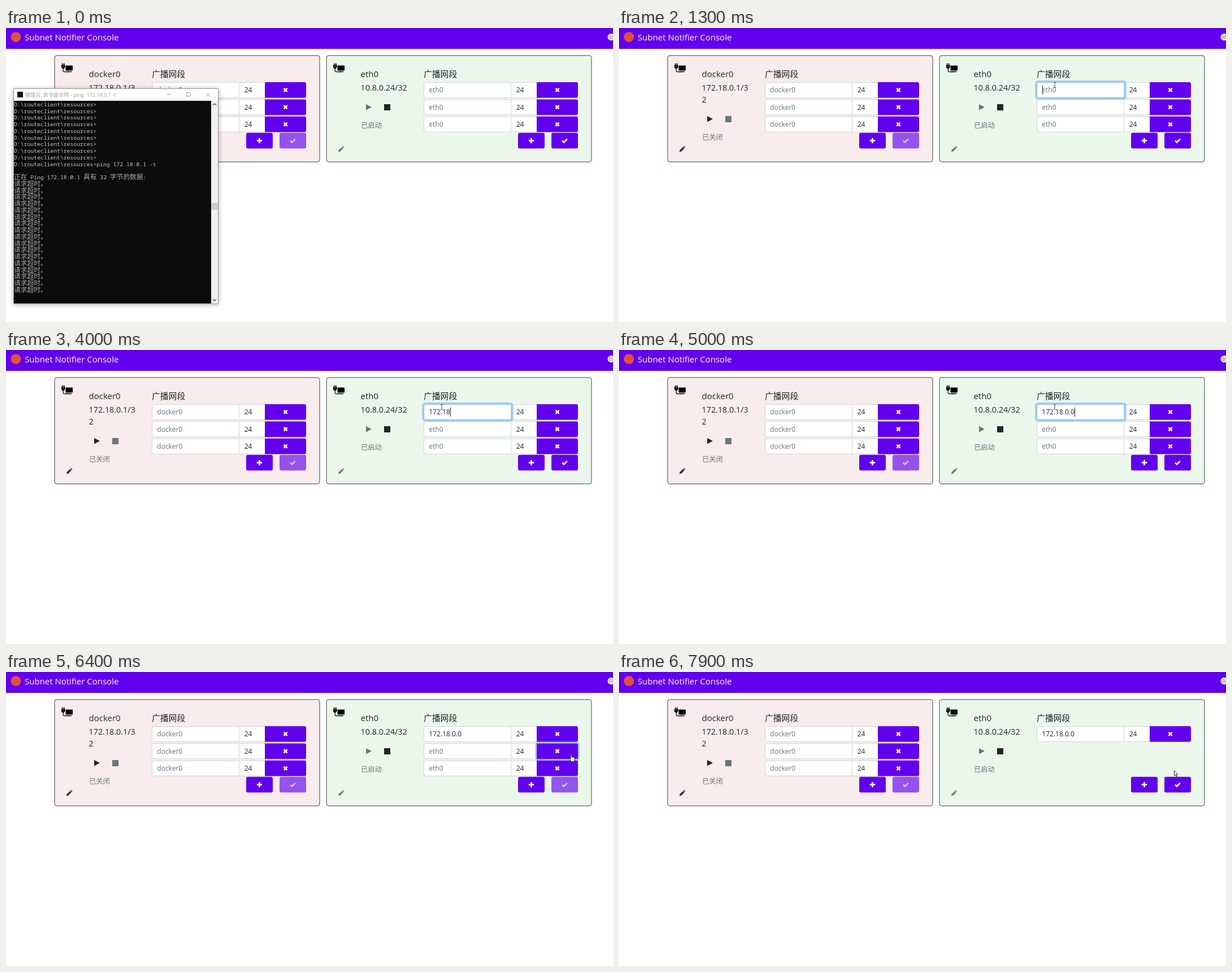
Recreate the animation shown at these times as an HTML page with a canvas. Size 1074 px wide and 521 px high, loop 8000 ms.

```html
<!DOCTYPE html>
<html lang="zh">
<head>
<meta charset="utf-8">
<title>Subnet Notifier Console</title>
<style>
html, body { margin: 0; width: 100%; height: 100%; overflow: hidden; background: #fff; }
canvas { display: block; }
</style>
</head>
<body>
<canvas id="stage" width="1074" height="521"></canvas>
<script>
const ctx = document.getElementById('stage').getContext('2d');
const LOOP = 8000;
const SANS = '"Open Sans", "Noto Sans CJK SC", "Noto Sans CJK", sans-serif';
const MONO = '"Noto Sans Mono", "Noto Sans CJK SC", "Noto Sans CJK", monospace';
const PURPLE = '#6200ee', INK = '#212529', MUTED = '#6c757d', BORDER = '#ced4da';
const ROW_HEIGHT = 27.8;

const TYPED = '172.18.0.0';
const KEY_TIMES = [2600, 2900, 3400, 3600, 3800, 4000, 4400, 4600, 4800, 5000];
const FOCUS = 1300, BLUR = 6400, FIRST_DELETE = 6500, SECOND_DELETE = 6800, SAVED = 7000;

// time, shape, x, y: the pointer jumps between these places
const POINTER = [
  [500, 'arrow', 934, 70], [600, 'arrow', 850, 82], [700, 'beam', 772, 100],
  [1000, 'beam', 771, 101], [5900, 'beam', 822, 109], [6000, 'beam', 886, 121],
  [6100, 'hand', 1006, 144], [6200, 'hand', 1000, 146],
  [6900, 'arrow', 982, 144], [7000, 'arrow', 969.5, 141.5],
  [7500, 'arrow', 970, 145.5], [7800, 'arrow', 976, 160], [7900, 'arrow', 982, 174]
];

function text(str, x, y, size, color, family = SANS) {
  ctx.font = `${size}px ${family}`;
  ctx.fillStyle = color;
  ctx.fillText(str, x, y);
}

function rect(x, y, w, h, color) {
  ctx.fillStyle = color;
  ctx.fillRect(x, y, w, h);
}

function rounded(x, y, w, h, radius, fill, stroke, width = 1) {
  ctx.beginPath();
  ctx.roundRect(x, y, w, h, radius);
  if (fill) { ctx.fillStyle = fill; ctx.fill(); }
  if (stroke) { ctx.strokeStyle = stroke; ctx.lineWidth = width; ctx.stroke(); }
}

function circle(x, y, r, color) {
  ctx.fillStyle = color;
  ctx.beginPath();
  ctx.arc(x, y, r, 0, 7);
  ctx.fill();
}

function draw(path, x, y, { fill, stroke, width = 1 }) {
  const shape = new Path2D(path);
  ctx.save();
  ctx.translate(x, y);
  if (fill) { ctx.fillStyle = fill; ctx.fill(shape); }
  if (stroke) { ctx.strokeStyle = stroke; ctx.lineWidth = width; ctx.stroke(shape); }
  ctx.restore();
}

const ICONS = {
  times: 'M-3-3L3 3M3-3L-3 3',
  plus: 'M-4.7 0H4.7M0-4.7V4.7',
  check: 'M-4.4.2L-1.5 3L4.4-2.9'
};

function button(x, y, w, icon, radius = 3, faded = false) {
  ctx.globalAlpha = faded ? 0.65 : 1;
  rounded(x, y, w, ROW_HEIGHT, radius, PURPLE);
  draw(ICONS[icon], x + w / 2, y + ROW_HEIGHT / 2, { stroke: '#fff', width: 2.7 });
  ctx.globalAlpha = 1;
}

function focusRing(x, y, w) {
  rounded(x - 1.5, y - 1.5, w + 3, ROW_HEIGHT + 3, 4, null, 'rgba(95,165,250,.5)', 3);
}

function networkIcon(x, y) {
  draw('M7.5 4.5h11.5q1 0 1 1v7q0 1-1 1H7.5zM9 14.7h9v1.5h-9zM0 3.5h6.5v4L4.5 10H2L0 8zM1 .5h1.5v3H1zM4 .5h1.5v3H4z', x, y, { fill: '#000' });
  draw('M3.2 9V14Q3.2 15.7 5 15.7H12', x, y, { stroke: '#000', width: 1.2 });
  rect(x + 2, y + 5.5, 2, 1, '#bbb');
}

function pencil(x, y, color) {
  draw('M-5 5L-4.3 1.7L1.2-3.8L3.8-1.2L-1.7 4.3ZM1.9-4.5L2.6-5.1Q3.2-5.5 3.8-5L5-3.8Q5.5-3.2 5.1-2.6L4.5-1.9Z', x, y, { fill: color });
  draw('M-2.4 1.7L1.6-2.3', x, y, { stroke: '#fff8', width: 0.7 });
}

function row(x, y, value, isPlaceholder) {
  rounded(x + 258.5, y + 0.5, 200, ROW_HEIGHT - 1, [3, 0, 0, 3], '#fff', BORDER);
  rect(x + 412, y, 1, ROW_HEIGHT, BORDER);
  text(value, x + 267.3, y + 18.3, 12, isPlaceholder ? MUTED : INK);
  text('24', x + 421.7, y + 18.3, 12, INK);
  button(x + 458, y, 73, 'times', [0, 3, 3, 0]);
}

const rowTop = i => 96 + 30.4 * i;

function card(x, { name, address, running, background, rows, value, saving }) {
  rounded(x + 86, 48.8, 469, 188.5, 4, background, '#3c4043');
  networkIcon(x + 98, 62);
  text(name, x + 146.6, 87, 15, INK);
  text('广播网段', x + 258, 87.4, 14.8, INK);
  address.forEach((line, i) => text(line, x + 146.6, 111.2 + 21 * i, 14.3, INK));

  const top = 135 + 21 * (address.length - 1);
  draw('M0 0L10 5.3L0 10.6Z', x + 156, top, { fill: running ? MUTED : INK });
  rect(x + 188, top, 11, 11, running ? INK : MUTED);
  text(running ? '已启动' : '已关闭', x + 147, top + 41.5, 12.3, MUTED);
  pencil(x + 112, 214.5, running ? '#6b716c' : INK);

  for (let i = 0; i < rows; i++) {
    const filled = i === 0 && value;
    row(x, rowTop(i), filled ? value : name, !filled);
  }
  button(x + 425, 185.7, 47, 'plus');
  button(x + 484, 185.7, 47, 'check', 3, !running || saving);
}

// Console text sits on a grid; wide characters take two cells.
function consoleLine(str, y) {
  const cell = 5.86;
  let x = 14;
  for (const run of str.match(/[\x00-\x7f]+|[^\x00-\x7f]+/g) || []) {
    const wide = run.charCodeAt(0) > 127;
    text(run, x, y, wide ? cell * 2 : cell / 0.6, wide ? '#aaa' : '#c4c4c4', MONO);
    x += run.length * cell * (wide ? 2 : 1);
  }
}

function terminal() {
  const prompt = 'D:\\routeclient\\resources>';
  const lines = [
    ...Array(9).fill(prompt), prompt + 'ping 172.18.0.1 -t', '',
    '正在 Ping 172.18.0.1 具有 32 字节的数据:', ...Array(17).fill('请求超时。')
  ];
  ctx.save();
  ctx.shadowColor = 'rgba(0,0,0,.35)';
  ctx.shadowBlur = 8;
  ctx.shadowOffsetY = 1;
  rect(13, 107, 363, 382, '#fff');
  ctx.restore();
  rounded(13.5, 107.5, 362, 381, 0, null, '#999');
  rect(20, 113, 10, 10, '#111');
  text('管理员: 命令提示符 - ping  172.18.0.1 -t', 33.7, 121.5, 9.15, '#999');
  draw('M285 117.5H292M319.5 114.5h6.5v6.5h-6.5zM354 114.5l7 7M361 114.5l-7 7', 0, 0, { stroke: '#999' });

  rect(14, 129, 349, 359, '#0c0c0c');
  rect(363, 129, 12, 359, '#f0f0f0');
  rect(363.5, 310, 11, 12, '#cdcdcd');
  draw('M366 137l3-3l3 3M366 480.5l3 3l3-3', 0, 0, { stroke: '#505050', width: 1.3 });
  lines.forEach((line, i) => consoleLine(line, 138.8 + 11.75 * i));
}

const HAND = 'M-1 0Q0-1.4 1 0V4.5L5.5 5.5Q6.7 6 6.5 8L5 13H0L-3.3 8.2Q-3 6.5-2.2 7L-1 8.3Z';
const ARROW = 'M.5.5V10L2.6 8L4.1 11.4L5.4 10.8L4 7.5H6.8Z';
const BEAM = 'M-2-4.5H-.5L0-4L.5-4.5H2M0-4V4M-2 4.5H-.5L0 4L.5 4.5H2';
const POINTER_SHAPES = {
  hand: [HAND, { fill: '#fff', stroke: '#111' }],
  arrow: [ARROW, { fill: '#fff', stroke: '#222', width: 0.9 }],
  beam: [BEAM, { stroke: '#444' }]
};

function pointer(t) {
  const step = POINTER.findLast(([start]) => t >= start);
  if (!step) return;
  const [, shape, x, y] = step;
  const [path, style] = POINTER_SHAPES[shape];
  draw(path, x, y, style);
}

function editing(t, value) {
  const y = rowTop(0);
  rounded(739.5, y + 0.5, 155, ROW_HEIGHT - 1, [3, 0, 0, 3], null, '#80bdff');
  focusRing(739, y, 156);
  const lastInput = KEY_TIMES.findLast(time => t >= time) || FOCUS;
  if (Math.floor((t - lastInput) / 500) % 2 === 0) {
    ctx.font = `12px ${SANS}`;
    rect(Math.round(748.5 + ctx.measureText(value).width), 102, 1, 16, INK);
  }
}

function render(t) {
  const value = TYPED.slice(0, KEY_TIMES.filter(time => t >= time).length);
  rect(0, 0, 1074, 521, '#fff');
  rect(0, 0, 1074, 37, PURPLE);
  circle(17.5, 16, 9, '#e0523c');
  text('Subnet Notifier Console', 33, 21.8, 15, '#fff');
  circle(1070.5, 16, 6, '#fff');
  circle(1070, 16, 4.5, '#c9c9c9');

  card(0, {
    name: 'docker0', address: ['172.18.0.1/3', '2'], running: false,
    background: '#f9ecec', rows: 3
  });
  card(481, {
    name: 'eth0', address: ['10.8.0.24/32'], running: true, background: '#ebf7eb',
    rows: t < FIRST_DELETE ? 3 : t < SECOND_DELETE ? 2 : 1,
    value, saving: t >= BLUR && t < SAVED
  });

  if (t < FOCUS) terminal();
  else if (t < BLUR) editing(t, value);
  else if (t < SECOND_DELETE) focusRing(939, rowTop(1), 73);
  pointer(t);
}

function frame() {
  render(performance.now() % LOOP);
  requestAnimationFrame(frame);
}
frame();
</script>
</body>
</html>
```
